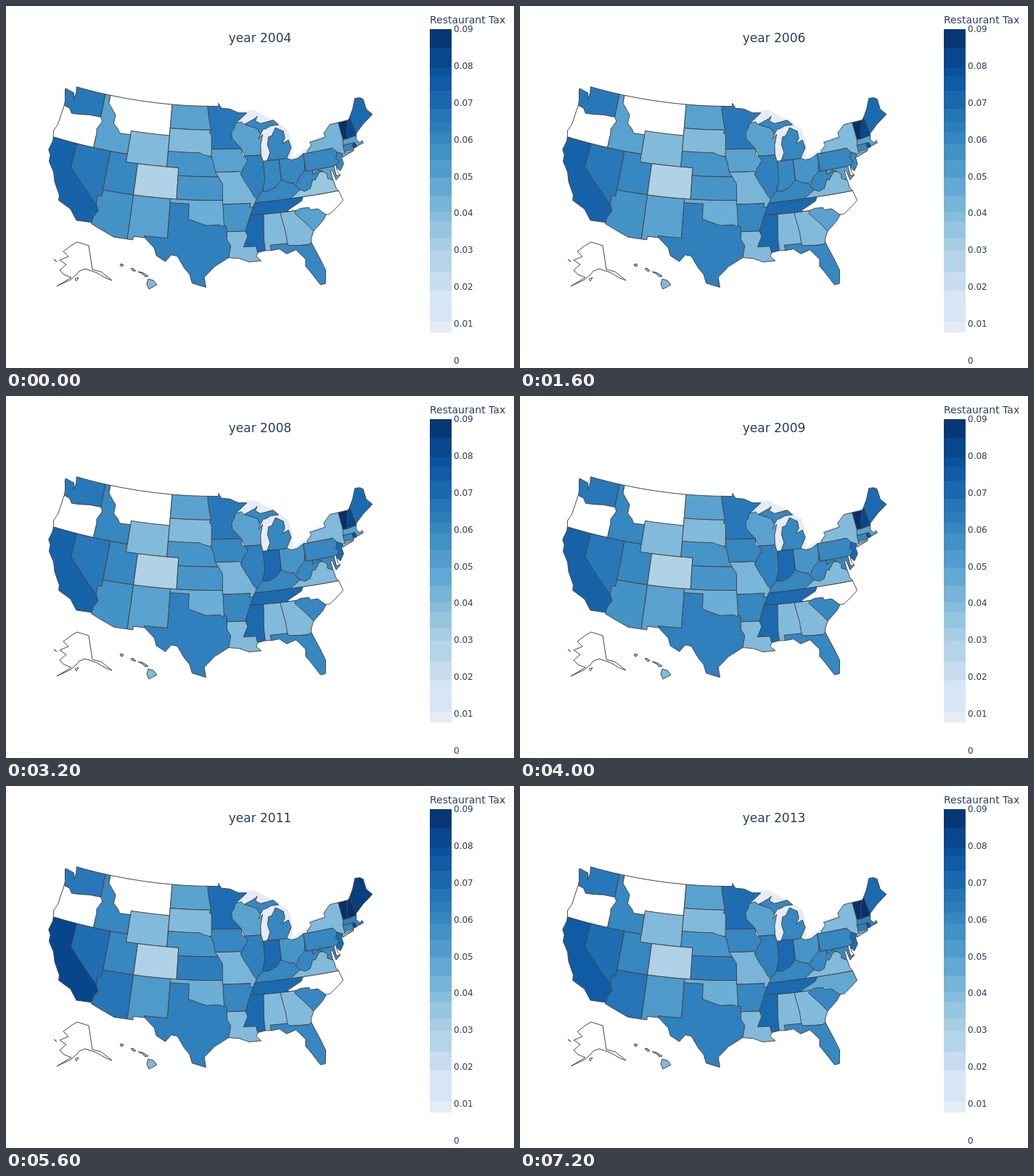
Recreate the animation shown at these times as an HTML page. Size 700 by 500 pixels, loop 8 s.

```html
<!DOCTYPE html>
<html lang="en">
<head>
<meta charset="utf-8">
<style>
  html, body { margin: 0; width: 100%; height: 100%; overflow: hidden; background: #fff; }
  svg { display: block; width: 700px; height: 500px; font: 12px "DejaVu Sans", Verdana, sans-serif; fill: #2a3f5f; }
  .state { stroke: #444; stroke-linejoin: round; }
</style>
</head>
<body>
<svg viewBox="0 0 700 500">
  <g id="map"></g>
  <g id="scale"></g>
  <text x="584" y="24" font-size="14">Restaurant Tax</text>
  <text id="title" x="350" y="50" font-size="17" text-anchor="middle"></text>
</svg>
<script>
const YEAR_MS = 800, FIRST_YEAR = 2004, YEARS = 10, MAX_TAX = 90;
const blues = ['247 251 255', '222 235 247', '198 219 239', '158 202 225', '107 174 214',
  '66 146 198', '33 113 181', '8 81 156', '8 48 107'].map(c => c.split(' ').map(Number));

function taxColor(tax) {
  if (!tax) return '#fff';
  const pos = tax / MAX_TAX * 8, i = Math.min(7, Math.floor(pos));
  return `rgb(${blues[i].map((c, k) => Math.round(c + (blues[i + 1][k] - c) * (pos - i)))})`;
}

// Albers equal-area conic with standard parallels 29.5 and 45.5.
const RAD = Math.PI / 180, S0 = Math.sin(29.5 * RAD), N = (S0 + Math.sin(45.5 * RAD)) / 2;
function project(west, north) {
  const r = 618.6 * Math.sqrt(1 + S0 * (2 * N - S0) - 2 * N * Math.sin(north * RAD)) / N;
  const a = N * (96 - west) * RAD;
  return [286.7 + r * Math.sin(a), r * Math.cos(a) - 543.2].map(v => v.toFixed(2));
}

// "west north" pairs in degrees; two pairs are opposite corners of a box.
function outline(text) {
  let pts = text.match(/\S+ \S+/g).map(p => p.split(' ').map(Number));
  if (pts.length == 2) {
    const [[w, n], [e, s]] = pts;
    pts = [[w, n], [e, n], [e, s], [w, s]];
  }
  const fine = pts.flatMap(([x, y], i) => {
    const [nx, ny] = pts[(i + 1) % pts.length];
    return [0, .25, .5, .75].map(t => project(x + (nx - x) * t, y + (ny - y) * t));
  });
  return 'M' + fine.join('L') + 'Z';
}

function add(parent, tag, attrs, text = '') {
  const el = document.createElementNS('http://www.w3.org/2000/svg', tag);
  for (const key in attrs) el.setAttribute(key, attrs[key]);
  el.textContent = text;
  return document.getElementById(parent).appendChild(el);
}

const shapes = {}, firstTaxes = {};
function addShape(id, tax, d) {
  shapes[id] = add('map', 'path', { d, class: 'state' });
  firstTaxes[id] = tax;
}
const state = (id, tax, ...rings) => addShape(id, tax, rings.map(outline).join(''));

add('map', 'path', { fill: '#e5ecf6', d: outline('92 48.3 88.4 48.3 84.6 46.6 82.55 45.35 82.1 43.57 82.4 41.7 78.9 42.9 79.2 43.5 76.5 43.8 76.5 43 80 41.5 87 41.6 92 46.6') });

// Later states cover earlier ones, so each shared border is drawn by the upper one only.
state('MT', 0, '116.05 49 104.05 44.3');
state('OR', 0, '124 46.27 119 46.3 116.5 46 116.5 44 117.03 43.5 117.03 42 124.2 42 124.5 42.8 124.1 43.7');
state('WA', 65, '122.76 49 117.03 49 116.95 46 119 45.95 121.2 45.65 122.3 45.55 122.9 46.1 124 46.27 124.1 46.9 124.7 48.2 124.7 48.4 122.9 48.15 122.6 47.3 122.5 48.2');
state('UT', 60, '114.05 42 109.05 37');
state('WY', 40, '111.05 45 104.05 41');
state('NV', 65, '120 42 114.05 35');
state('ID', 50, '117.03 49 116.05 49 116.05 48 114.35 46.65 114.4 45.55 113.45 44.95 113 44.45 111.05 44.5 111.05 42 117.03 42 117.03 43.8 117.2 44.4 116.5 45.5 116.95 46');
state('CA', 72.5, '124.2 42 120 42 120 39 114.63 35 114 34 114.3 32.7 117.13 32.53 118.4 33.75 120.5 34.45 120.65 35.15 121.9 36.6 122.5 37.75 123.7 38.9 123.8 39.7 124.35 40.3 124.1 41.5');
state('AZ', 56, '114.05 37 109.05 37 109.05 31.33 111.07 31.33 114.82 32.5 114.7 33.4 114.15 34.3 114.63 35 114.7 36.1 114.05 36.2');
state('NM', 50, '109.05 37 103.03 37 103.05 31.78 108.2 31.78 108.2 31.33 109.05 31.33');
state('CO', 29, '109.05 41 102.05 37');
state('AR', 55, '95 36.5 89.4 33');
state('TX', 62.5, '103.05 32 106.62 32 106.4 31.7 104.9 30.6 104.5 29.65 103.1 28.98 102.3 29.9 101.4 29.77 100.3 28.3 99.5 27.5 99.1 26.4 97.15 25.9 97.4 27.2 95.9 28.6 93.85 29.7 93 30 93 32 94.04 32.5 94.04 33.55 95 34.5 99.5 35 99.5 36.8 103.05 36.8');
state('OK', 45, '103.03 37 94.6 37 94.45 33.65 95.2 33.9 97.2 33.8 100 34.56 100 36.5 103.03 36.5');
state('LA', 40, '94.04 33 90 33 90 31.5 89.2 31 89.5 30.2 89.8 29.7 89.1 29.1 90.9 29.05 92.3 29.55 93.85 29.7 93.5 31.2 94.04 32');
state('ND', 50, '104.05 49 96.5 45.94');
state('SD', 40, '104.05 45.94 96.2 42.6');
state('KS', 55, '102.05 40 94.3 37');
state('NE', 55, '104.05 43 98.5 43 97.9 42.8 96.45 42.5 95.5 40.8 95.3 40 102.05 40 102.05 41 104.05 41');
state('MO', 42, '95.8 40.58 91 40.6 89.5 38 89 36.7 89.3 36 90.35 36 90.15 36.5 94.62 36.5 94.6 39.1 95.3 40');
state('IA', 50, '96.45 43.5 91.2 43.5 91.1 42.7 90 42 91.4 40.4 91.75 40.6 95.8 40.58 96.1 41.7 96.45 42.5');
state('MN', 65, '97.23 49 95.15 49 95.15 49.38 94.6 48.75 92.9 48.6 91.4 48.07 89.8 48 92 46.72 92 45 91.2 43.5 96.45 43.5 96.45 45.3 96.85 45.6 96.56 45.94 97.1 48');
state('WI', 50, '92.1 46.72 90.9 46.9 90.4 46.55 89 46.3 87.8 45.8 87.6 45.1 88 44.55 87.2 45.1 87.75 43.7 87.8 42.5 90.65 42.5 91.2 43.5 92.75 44.8 92.8 45.6 92.28 46.1');
state('OH', 60, '84.8 41.7 83.45 41.73 82.7 41.45 81.7 41.5 80.52 41.98 80.52 39.5 82 38.5 84.8 38.5');
state('IN', 60, '88 41.7 84.82 37.6');
state('IL', 62.5, '90.65 42.5 87.8 42.5 87.53 41.65 87.53 39.35 88.1 37.9 89.15 37 89.5 37.3 90.2 38.4 90.7 39 91.5 40.2 90.95 41.1 90.15 41.9');
state('MI', 60, '84.8 41.7 83.45 41.73 82.42 43 82.7 44 83.9 43.65 83.3 44.3 83.4 45.2 84.75 45.77 85.6 44.8 86.2 44.7 86.5 43.7 86.2 42.7 86.8 41.76',
  '90.4 46.55 88.4 47.2 87.9 47.47 88.3 46.9 87.4 46.5 85 46.77 84.1 46.1 85.5 46.08 86.6 45.75 87 45.75 87.6 45.1 88.1 45.9');
state('PA', 60, '80.52 42 74.8 39.72');
state('NY', 42.5, '79.76 42 75.35 42 74.7 41.35 73.9 41 74 40.57 71.9 41.07 73.7 41 73 41.3 73 44 73.35 45 74.9 45 76.3 44.1 76.2 43.55 79.05 43.27 78.9 42.85 79.76 42.25');
state('NJ', 60, '74.7 41.35 73.9 41 74.2 40.5 74.1 39.75 74.9 38.95 75.5 39.6 74.75 40.2 75.2 40.7');
state('CT', 60, '73.5 42.03 71.83 41.2');
state('RI', 80, '71.83 42.03 71.25 41.4');
state('MA', 50, '73.25 42.75 70.8 42.87 71 42.3 70.5 41.8 70.1 42.05 69.95 41.7 71.15 41.5 71.4 42.03 73.5 42.03');
state('VT', 90, '73.35 45 71.5 45 72.1 44 72.46 42.73 73.25 42.75');
state('NH', 82, '71.5 45 71.1 45.3 70.75 43.08 70.8 42.87 72.46 42.73 72.1 44');
state('ME', 70, '71.1 45.3 70.2 46.2 69.23 47.46 68.3 47.35 67.8 47.07 67.8 45.7 67 44.85 69.1 44 70.75 43.08');
state('MD', 50, '79.48 39.72 75.75 39.72 75.7 38.46 75.05 38.45 75.9 37.95 76.2 39.2 76.5 39.2 76.4 38 77.6 38.3 78 39.2 79.48 39.2');
state('DE', 0, '75.79 39.72 75.4 39.8 75.4 39 75.05 38.45 75.7 38.46');
state('VA', 35, '83.68 36.6 82.5 37.5 81.5 38 79.5 39 78.1 39.45 77.72 39.32 77.1 38.9 77.25 38.4 76.35 38 76.2 37 75.87 36.55');
state('WV', 60, '80.52 40.65 80.52 39.72 79.48 39.72 79.48 39.2 78.4 39.6 77.72 39.32 78.35 39.35 79.3 38.42 79.65 38.58 80.3 37.5 81.2 37.25 81.97 37.54 82.6 38.15 81.7 39.2 80.85 39.7');
state('NC', 0, '84.5 35 83.1 35 80 34.5 78.6 33.9 77.9 33.9 76.5 34.65 75.5 35.25 75.87 36.55 81.68 36.6 82.5 36.3 84.5 35.3');
state('KY', 60, '89.4 36.5 89.15 37 88.1 37.9 87.1 37.85 85.8 38.3 84.85 39.1 83.7 38.65 82.6 38.4 82.6 38.15 81.97 37.54 83.68 36.6');
state('MS', 70, '90.3 35 88 35 88.4 30.35 89.55 30.18 89.75 31 91.6 31 90.9 32.3 91.2 33');
state('GA', 40, '86 35 83.1 35 82 34 80.85 32.1 81.4 31.2 81.5 30.5 85 30.6 86 31.5');
state('AL', 40, '88.2 35 85.6 35 85.1 32.5 85 30.8 87.4 30.8 87.5 30.3 88.4 30.35 88.47 31.9');
state('TN', 70, '90.3 35 89.5 36.5 83.68 36.6 81.68 36.6 82 36.1 84.3 35.2 84.32 35');
state('SC', 50, '83.35 34.7 83.1 35 82.3 35.2 81 35.15 80.8 34.82 79.67 34.8 78.55 33.86 79.2 33.2 80.85 32.1 81.9 33.3');
state('FL', 60, '87.6 31 85 31 84.86 30.7 82.1 30.45 81.45 30.7 80.55 28.4 80.05 26.9 80.4 25.2 81.1 25.15 82.1 26.8 82.8 27.8 82.65 28.7 83.9 30.05 85.3 29.68 86.3 30.4 87.5 30.3');

// Insets sit directly in stage pixels.
addShape('AK', 0, 'M91 330L98 326 114 331 119 364 131 367 146 379 138 376 124 368 109 363 101 366 97 371 89 378 70 387 90 375 80 371 74 365 83 357 74 351 86 346 79 339ZM66 350L70 353ZM95 377L100 375 97 380Z');
addShape('HI', 40, 'M157 357l3-1 2 2-3 2ZM172 363l3-1 4 4-4 0ZM182 367l6 1 8 5-4 1-4-4ZM196 377l7 2 5 6-11 6-3-7Z');

const changes = {
  2005: { AR: 60, VA: 40 },
  2006: { OH: 55, NY: 40 },
  2007: { ID: 60, NJ: 70, SC: 60 },
  2008: { IA: 60, IN: 70, MD: 60 },
  2010: { CA: 82.5, NV: 68.5, MN: 68.8, MA: 62.5, NH: 90, ME: 85 },
  2011: { AZ: 66, KS: 63, NM: 53 },
  2012: { CA: 72.5, ME: 70, CT: 63.5 },
  2013: { CA: 75, NC: 47.5 }
};

const bands = [32, 58, 85, 97, 117, 142, 160, 175, 190, 213, 237, 262, 284, 298, 321, 338, 367, 393, 436, 451];
bands.slice(1).forEach((end, i) => {
  const y = bands[i], tax = (490 - (y + end) / 2) / 458 * MAX_TAX;
  add('scale', 'rect', { x: 584, y, width: 30, height: end - y, fill: end == 451 ? '#e5ecf6' : taxColor(tax) });
});
for (let i = 0; i < 10; i++)
  add('scale', 'text', { x: 617, y: 494 - i * 50.9 }, i ? '0.0' + i : '0');

let shown;
function draw(now) {
  const year = FIRST_YEAR + Math.floor(now / YEAR_MS) % YEARS;
  if (year != shown) {
    shown = year;
    const taxes = { ...firstTaxes };
    for (const y in changes) if (y <= year) Object.assign(taxes, changes[y]);
    for (const id in shapes) shapes[id].setAttribute('fill', taxColor(taxes[id]));
    document.getElementById('title').textContent = 'year ' + year;
  }
  requestAnimationFrame(draw);
}
draw(0);
</script>
</body>
</html>
```
